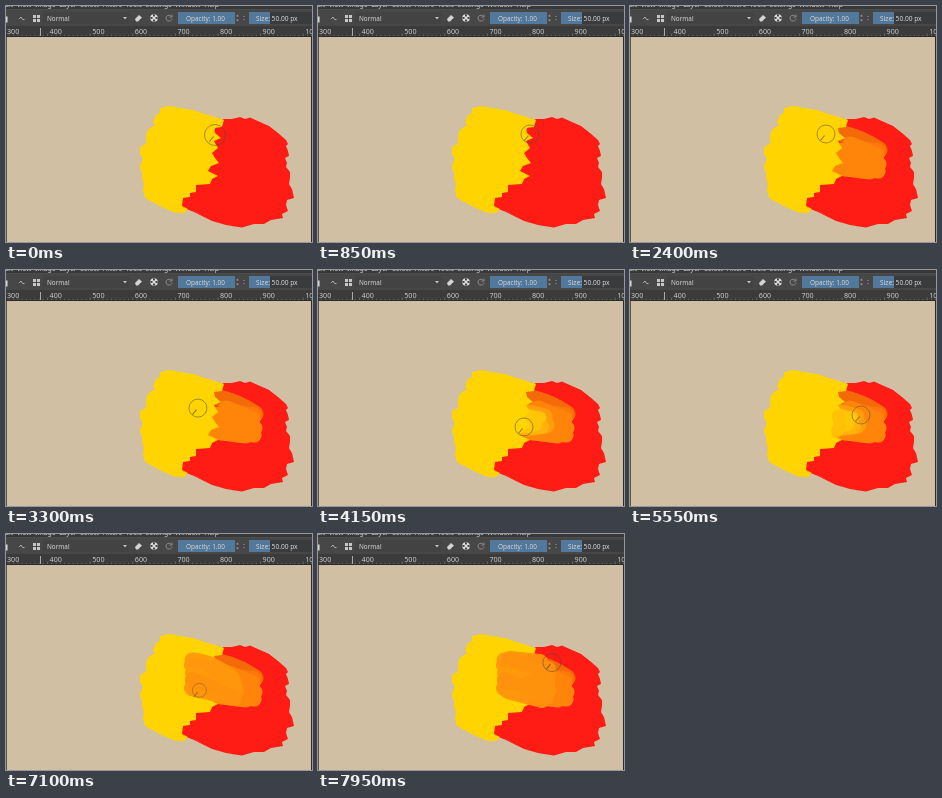
These frames come from a looping animation (306 by 236 pixels, 8000 ms). An HTML page:

```html
<!DOCTYPE html>
<html lang="en">
<head>
<meta charset="utf-8">
<title>Blending two colours</title>
<style>
  html, body { margin: 0; width: 100%; height: 100%; overflow: hidden; background: #d1bfa3; }
  svg { display: block; width: 100vw; height: 100vh; }
  text { font-family: "Noto Sans", "Open Sans", sans-serif; font-size: 6.4px; fill: #d6d6d6; }
  #ruler text { font-size: 7.2px; fill: #cacaca; }
  .stroke { fill: none; stroke-linecap: round; stroke-linejoin: round; }
</style>
</head>
<body>
<svg viewBox="0 0 306 236" xmlns="http://www.w3.org/2000/svg">
  <filter id="soft" x="150" y="100" width="130" height="100" filterUnits="userSpaceOnUse">
    <feGaussianBlur stdDeviation=".7"/>
  </filter>
  <rect width="306" height="236" fill="#d1bfa3"/>

  <path fill="#ff1c14" d="M213 115 L218 113 L226 113 L234 111 L239 113 L244 111.5 L254 116 L263 120 L272 127 L280 134
    L282 138 L280 140 L282 145 L283 150 L279 152 L281 157 L280 161 L284 166 L284 172 L283 178 L286 183
    L288 192 L281 194 L280 199 L282 205 L276 208 L277 212 L265 214 L258 218 L248 218 L236 221.5 L229 220.5 L220 219
    L206 215 L196 210 L188 206 L183 204 L176 202 L175 192 L190 160Z"/>
  <g id="under" filter="url(#soft)"></g>
  <path fill="#ffd400" d="M154 102 L164 100 L174 102 L187 104 L197 107.5 L207 110.5 L218 114 L216 121 L208 122 L209 127
    L215 132 L208 135 L212 142 L206 147 L209 152 L213 157 L205 160 L202 165 L212 170 L206 173 L204 178 L190 179
    L190 186 L184 187 L184 191 L177 192 L176 200 L182 203 L178 207 L170 207 L160 203 L150 198 L139 192 L137 184
    L138 178 L136 172 L136 166 L134 162 L135 157 L137 153 L134 148 L134 141 L140 138 L140 132 L141 126 L144 122
    L149 119 L147 116 L150 109 L154 107Z"/>
  <g id="over" filter="url(#soft)"></g>

  <g id="cursor" fill="none" stroke="#4e4a40" stroke-width=".8">
    <circle id="ring"/>
    <path d="M-5.5 6.5 L-1.5 1.5" stroke-width="1.1"/>
    <path d="M7.5 3.5h1.5" stroke="#667078"/>
  </g>

  <rect width="306" height="31" fill="#474747"/>
  <rect width="306" height="3" fill="#393939"/>
  <text x="-5" y="1.2" style="font-size:6.8px" xml:space="preserve">Edit  View  Image  Layer  Select  Filters  Tools  Settings  Window  Help</text>
  <path d="M0 3.5H306" stroke="#505050" stroke-width=".6"/>

  <path d="M.8 10.5v6" stroke="#e4e4e4" stroke-width="1.4"/>
  <path d="M13 13l2-2 1.5 2.5h2" fill="none" stroke="#b5b5b5" stroke-width=".9"/>
  <path d="M27 9h3v3h-3z M31 9h3v3h-3z M27 13h3v3h-3z M31 13h3v3h-3z" fill="#c8c8c8"/>
  <rect x="37" y="6" width="86" height="12" rx="1" fill="#434343"/>
  <text x="41" y="14.5">Normal</text>
  <path d="M117 11h4l-2 2.5z" fill="#c0c0c0"/>
  <path d="M129 13l4-4 3 2.5-4 4h-2z" fill="#d4d4d4"/>
  <circle cx="148" cy="12" r="3.8" fill="#dcdcdc"/>
  <path d="M147 8.5h2v2h-2z M147 13.5h2v2h-2z M144.5 11h2v2h-2z M149.5 11h2v2h-2z" fill="#444"/>
  <path d="M165.5 10.5a3 3 0 1 0 .5 2 M166 8.5v2.5h-2.5" fill="none" stroke="#8c8c8c"/>

  <rect x="172" y="6" width="57" height="12" fill="#52789c"/>
  <text x="180" y="14.5">Opacity: 1.00</text>
  <path d="M230 10.5l1.5-2 1.5 2z M230 13.5l1.5 2 1.5-2z" fill="#999"/>
  <path d="M238 10v1 M238 13v1" stroke="#999"/>
  <rect x="243" y="6" width="63" height="12" fill="#3a3b3c"/>
  <rect x="243" y="6" width="21" height="12" fill="#52789c"/>
  <text x="250" y="14.5" style="font-size:6.6px">Size: 50.00 px</text>

  <rect y="20" width="306" height="10.5" fill="#3b3b3b"/>
  <g id="ruler"></g>
  <path d="M34.5 22v8" stroke="#ddd" stroke-width=".7"/>
  <path d="M0 30.5H306" stroke="#2a2a2a"/>
  <path d="M.4 30V236" stroke="#3a3a3a" stroke-width=".9"/>
  <path d="M305.5 30V236" stroke="#2c2c2c"/>
</svg>

<script>
const LOOP = 8000, STEP = 50;
const $ = id => document.getElementById(id);

function add(parent, tag, attrs) {
  const el = document.createElementNS("http://www.w3.org/2000/svg", tag);
  for (const key in attrs) el.setAttribute(key, attrs[key]);
  return parent.appendChild(el);
}

for (let i = 0; i < 8; i++) {
  const x = 1 + i * 42.6;
  add($("ruler"), "text", { x, y: 28 }).textContent = 300 + i * 100;
  for (let k = 0; k < 10; k++) {
    const tx = x - 2 + k * 4.26;
    add($("ruler"), "path", { d: `M${tx} 30v${k ? -1.2 : -2.5}`, stroke: "#999", "stroke-width": .5 });
  }
}

// Pen movements in order; those with a colour leave paint.
const moves = [
  { end: 850, d: "M209 129 Q187 111 197 118 T225 133 T212 128" },
  { end: 1100, d: "M212 128 Q262 126 266 149 Q240 128 213 128" },
  { end: 1350, d: "M213 128 Q232 132 249 144", layer: "under", color: "#f46a08", width: 17 },
  { end: 1650, d: "M249 144 Q236 143 220 138", layer: "under", color: "#fd780a", width: 13 },
  { end: 2300, d: "M220 138 L247 149 L212 144 L249 158 L210 151 L248 165 L206 159 L240 166 L208 162 L224 164",
    layer: "under", color: "#ff850a", width: 15 },
  { end: 2400, d: "M224 164 Q216 136 196 128" },
  { end: 2600, d: "M196 128 Q200 134 208 144" },
  { end: 2950, d: "M208 144 Q160 115 128 75" },
  { end: 3400, d: "M128 75 Q165 130 211 147" },
  { end: 3650, d: "M211 147 L226 147 L207 142 L228 155 L208 158", layer: "under", color: "#ff9e0c", width: 17 },
  { end: 3900, d: "M208 158 L224 157 L208 145 L222 148", layer: "under", color: "#ffb30a", width: 14 },
  { end: 4150, d: "M222 148 L208 145 L218 155 L206 157", layer: "under", color: "#ffc506", width: 12 },
  { end: 4300, d: "M206 157 Q212 155 211 150" },
  { end: 4700, d: "M211 150 Q192 130 177 123" },
  { end: 4950, d: "M177 123 Q190 133 208 146" },
  { end: 5150, d: "M208 146 L210 156 L207 161", layer: "over", color: "#ffbf06", width: 12 },
  { end: 5350, d: "M207 161 Q262 180 295 170" },
  { end: 5550, d: "M295 170 Q260 148 231 145" },
  { end: 6000, d: "M231 145 Q212 122 186 126" },
  { end: 6200, d: "M186 126 Q206 127 226 144", layer: "over", color: "#ff980a", width: 15 },
  { end: 6300, d: "M226 144 Q215 140 206 136", layer: "over", color: "#ff980a", width: 13 },
  { end: 6850, d: "M206 136 L186 131 L228 149 L187 139 L230 157 L187 146", layer: "over", color: "#ff960c", width: 16 },
  { end: 7600, d: "M187 146 L228 164 L186 154 L224 166 L190 157 L224 146 L222 128 L192 125 L230 135 L228 160",
    layer: "over", color: "#ff920d", width: 16 },
  { end: 7800, d: "M228 160 Q247 147 241 138" },
  { end: 8000, d: "M241 138 Q238 130 231 127" }
];

let from = 0;
for (const m of moves) {
  m.start = from;
  from = m.end;
  m.path = add($(m.layer || "under"), "path", {
    d: m.d, class: "stroke", stroke: m.color || "none", "stroke-width": m.width || 0,
    "stroke-opacity": m.layer === "over" ? .93 : 1
  });
  m.length = m.path.getTotalLength();
}

const ease = p => p + .35 * p * (1 - p) * (2 * p - 1);

function draw(time) {
  const t = Math.floor((time % LOOP) / STEP) * STEP;
  for (const m of moves) {
    const p = Math.min(1, Math.max(0, (t - m.start) / (m.end - m.start)));
    const done = ease(p) * m.length;
    m.path.style.display = m.color && t >= m.start ? "" : "none";
    m.path.setAttribute("stroke-dasharray", `${done + .01} ${m.length + 1}`);
    if (t >= m.start && t < m.end) {
      const at = m.path.getPointAtLength(done);
      $("cursor").setAttribute("transform", `translate(${at.x} ${at.y})`);
      $("cursor").setAttribute("opacity", m.color ? .5 : .65);
      $("ring").setAttribute("r", m.color ? 7 : t < 850 ? 10.5 : 9);
    }
  }
}

const origin = performance.now();
function frame() {
  draw(performance.now() - origin);
  requestAnimationFrame(frame);
}
draw(0);
requestAnimationFrame(frame);
</script>
</body>
</html>
```
